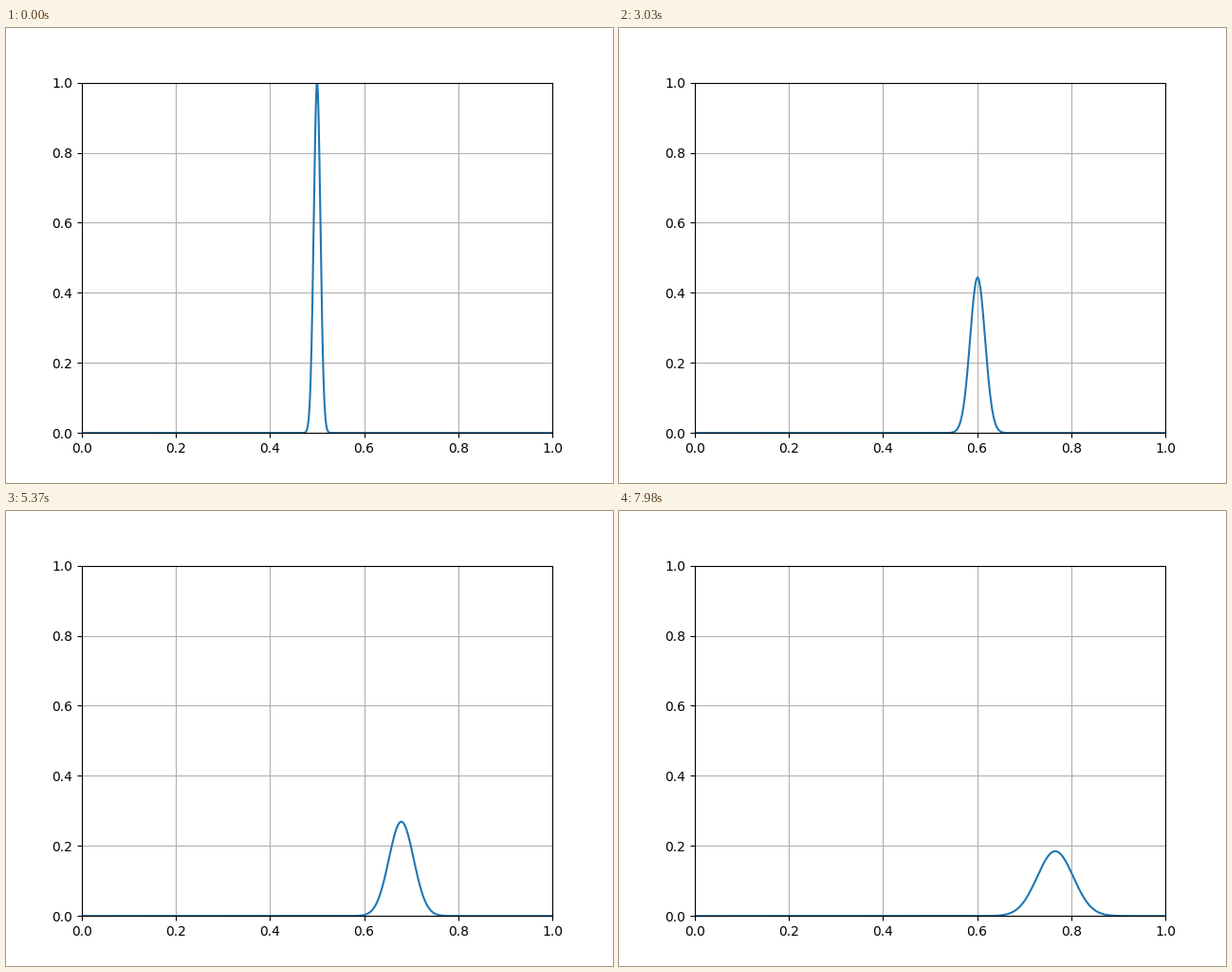
A matplotlib script that plays this animation: 640 by 480 pixels, repeating every 8000 ms.

```python
import numpy as np
import matplotlib.pyplot as plt
from matplotlib.animation import FuncAnimation

INTERVAL = 20      # ms per drawn frame
STEP = 30          # ms per simulation step
FRAMES = 400

X0 = 0.5           # starting centre of the packet
WIDTH = 0.01       # starting width
SPEED = 0.001      # drift per step
SPREAD = 50        # steps until the spreading sets in

x = np.linspace(0, 1, 1001)


def density(n):
    """Probability density of a free Gaussian wave packet after n steps."""
    growth = np.hypot(1, n / SPREAD)
    return np.exp(-((x - X0 - SPEED * n) / (WIDTH * growth)) ** 2) / growth


fig, ax = plt.subplots(figsize=(6.4, 4.8), dpi=100)
ax.set_xlim(0, 1)
ax.set_ylim(0, 1)
ax.grid(True)
line, = ax.plot(x, density(0), color="#1f77b4", lw=1.5)


def update(i):
    n = (i * INTERVAL + INTERVAL // 2) // STEP
    line.set_ydata(density(n))
    return line,


anim = FuncAnimation(fig, update, frames=FRAMES, interval=INTERVAL,
                     init_func=lambda: update(0), repeat=True, repeat_delay=0)
plt.show()
```
